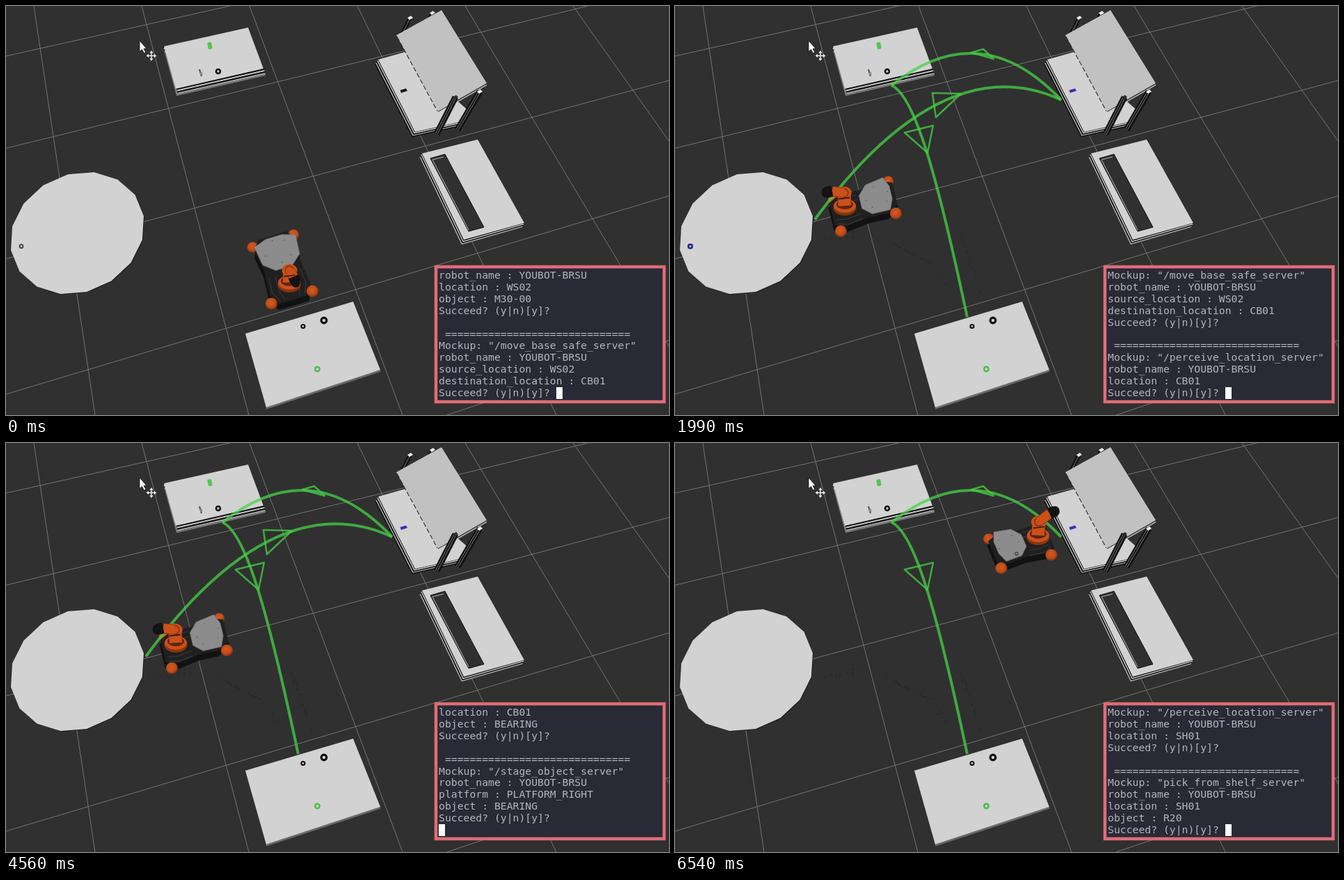
Animation of 953 by 588 pixels, one loop 8000 ms. Source, as an HTML page:

```html
<!DOCTYPE html>
<html lang="en">
<head>
<meta charset="utf-8">
<title>Robot task planner</title>
<style>
html, body { margin: 0; width: 100%; height: 100%; overflow: hidden; background: #303030; }
svg { display: block; width: 953px; height: 588px; }
text { font: 14.75px "DejaVu Sans Mono", monospace; fill: #b3b7ba; white-space: pre; }
</style>
</head>
<body>
<svg id="stage" viewBox="0 0 953 588" xmlns="http://www.w3.org/2000/svg">
  <defs>
    <radialGradient id="wheel" cx=".45" cy=".4" r=".6">
      <stop offset="0" stop-color="#d8591f"/><stop offset=".65" stop-color="#bd4c19"/><stop offset="1" stop-color="#7c3010"/>
    </radialGradient>
  </defs>
</svg>
<script>
const LOOP = 8000;
const stage = document.getElementById('stage');

function el(parent, tag, attrs) {
  const node = document.createElementNS('http://www.w3.org/2000/svg', tag);
  for (const key in attrs) node.setAttribute(key, attrs[key]);
  return parent.appendChild(node);
}
const group = (parent = stage) => el(parent, 'g', {});
const poly = (g, points, fill, stroke = 'none', width = 1) =>
  el(g, 'polygon', { points, fill, stroke, 'stroke-width': width, 'stroke-linejoin': 'round' });
const line = (g, points, stroke, width = 1, dash = 'none') =>
  el(g, 'polyline', { points, fill: 'none', stroke, 'stroke-width': width, 'stroke-dasharray': dash });
const disc = (g, [cx, cy], rx, fill, ry = rx) => el(g, 'ellipse', { cx, cy, rx, ry, fill });
const ring = (g, cx, cy, r, stroke, width) =>
  el(g, 'circle', { cx, cy, r, fill: 'none', stroke, 'stroke-width': width });

// parallel copies of an edge, one per shade
function layers(g, edge, dx, dy, shades, width = 1.4) {
  shades.forEach((shade, i) => {
    line(g, edge, shade, width).setAttribute('transform', `translate(${dx * i} ${dy * i})`);
  });
}

function drawGrid(g) {
  const gray = '#747474', horizon = -1380;
  for (let i = 0; i < 6; i++) line(g, `${40 + 155 * i},0 ${128 + 221 * i},588`, gray);
  for (let i = 0; i < 5; i++) {
    const depth = 1452 / (1 - .0836 * i), y = depth + horizon;
    line(g, `0,${y} 953,${y - 953 * depth / 6480}`, gray);
  }
}

const TOP = '#d2d2d2', BLACK = '#0c0c0c';

function drawRoundTable(g) {
  const rim = Array.from({ length: 16 }, (_, k) => {
    const a = k * Math.PI / 8, c = Math.cos(a), s = Math.sin(a);
    return [102.5 + 95.5 * c + 13.5 * s, 326.5 - 24.5 * c + 84.5 * s];
  });
  poly(g, rim, '#181818').setAttribute('transform', 'translate(.8 .8)');
  poly(g, rim, TOP);
}

function drawPost(g, x, y, dx, dy, width, cap) {
  const edge = `${x},${y} ${x + dx},${y + dy}`;
  line(g, edge, '#101010', width);
  for (let d = 3 - width / 2; d < width / 2 - 1; d += 2.5) {
    line(g, edge, '#858585', .9).setAttribute('transform', `translate(${d} ${d / 2})`);
  }
  poly(g, `${x - 4},${y} ${x + 1},${y - 3} ${x + 4},${y} ${x - 1},${y + 3}`, cap);
}

function drawTables(g) {
  drawRoundTable(g);

  layers(g, '227,58 244,120 371,91', .5, 2, [BLACK, '#c4c4c4', BLACK, '#a8a8a8', '#777'], 2);
  poly(g, '227,58 348,31 370,90 244,119', TOP);

  // shelf
  layers(g, '535,77 588,181 660,165', -1, 1.7, [BLACK, '#dcdcdc', BLACK, '#b0b0b0', BLACK]);
  poly(g, '535,77 574,66 630,120 662,148 656,166 588,181', TOP);
  line(g, '657,166 665,156', '#bbb', 1.2, '3 2');
  drawPost(g, 581, 17, -13, 26, 6, '#ededed');
  drawPost(g, 613, 10, -13, 26, 6, '#ededed');
  poly(g, '561,42 626,6 691,111 621,151', '#c1c1c1');
  line(g, '562,44 620,151', '#333', 1.2, '7 3');
  layers(g, '621,152 691,112', 0, 1.5, ['#444', '#ccc']);
  drawPost(g, 646, 131, -27, 53, 9, '#2c2c2c');
  drawPost(g, 681, 123, -32, 55, 9, '#ededed');

  // slotted table
  layers(g, '598,212 658,337 745,312', -.9, 1.7, [BLACK, '#dcdcdc', BLACK, '#b0b0b0']);
  poly(g, '598,212 678,192 745,312 658,336', TOP);
  poly(g, '610,219 631,213 687,318 665,324', '#303030', '#111');
  line(g, '665,322 613,221 629,217', '#bbb');

  layers(g, '374,578 538,524', .2, 1.2, ['#777', '#666']);
  poly(g, '344,471 499,425 538,523 374,577', TOP);
}

function drawParts(g) {
  el(g, 'rect', { x: 290, y: 52, width: 6, height: 10, rx: 2, fill: '#52c84e', transform: 'rotate(-12 293 57)' });
  line(g, '278,91 281,101', '#555', 2.2);
  line(g, '280,95 281,99', '#888', 3.5);
  for (const [x, y, r] of [[305, 94, 3], [427, 460.5, 2.5], [457, 452, 3.8]]) ring(g, x, y, r, BLACK, r * .85);
  ring(g, 447.5, 522, 3.2, '#4dbd4b', 2.5);
}

drawGrid(group());
const dust = group();
drawTables(group());
drawParts(group());

const bearing = { plain: group(), lit: group() };
ring(bearing.plain, 22, 345.5, 2.4, '#4a4a4a', 2);
ring(bearing.lit, 22, 345.5, 2.8, '#23238f', 2.6);
const block = { plain: group(), lit: group() };
for (const [g, fill] of [[block.plain, '#141414'], [block.lit, '#3434ad']]) {
  poly(g, '566.5,121 575,118.5 577,122 568,125', fill);
}

const bodies = group(), routes = group(), arms = group();
const ORANGE = '#cb5019', SHADE = '#87340f';
const SHELL = [[-1.1, .7], [-.7, 1], [0, .88], [.8, .98], [1.18, .7]];
const PLATE = [[-.95, .4], [-.8, 1], [-.15, .9], [.15, .4]];
const mirror = half => [...half, ...half.map(([a, b]) => [a, -b]).reverse()];

// A robot seen from above: centre, half length ahead, half width to its left.
function robot([cx, cy], [fx, fy], [lx, ly]) {
  const at = (a, b, lift = 0) => [cx + a * fx + b * lx, cy + a * fy + b * ly - lift];
  const outline = (half, lift) => mirror(half).map(([a, b]) => at(a, b, lift));
  const body = group(bodies), load = group(bodies), arm = group(arms);

  const wheels = [[-1, -1], [-1, 1], [1, -1], [1, 1]].map(([a, b]) => at(a, b));
  const far = wheels.filter(w => w[1] < cy), near = wheels.filter(w => w[1] >= cy);
  far.forEach(w => disc(body, w, 7.7, 'url(#wheel)'));
  poly(body, outline(SHELL, -3), '#121212', '#121212', 3);
  poly(body, outline(SHELL, 4), '#202020');
  for (const b of [-.75, -.45, .45, .75]) line(body, [at(.2, b, 2), at(.7, b * 1.1, 2), at(1.05, b * .8, 2)], '#363636', 1.3);
  poly(body, outline(PLATE, 8), '#8c8c8c', '#777', .7);
  for (let i = 0; i < 5; i++) disc(body, at(-.45 + .4 * Math.cos(i * 2.4), .65 * Math.sin(i * 2.4), 8), .8, '#555');
  near.forEach(w => disc(body, w, 8.5, 'url(#wheel)'));

  const [x, y] = at(-.31, -.7, 8);
  ring(load, x, y, 2, '#3a3a3a', 1.2);

  const base = at(.72, 0, 10), elbow = at(.75, 0, 29), wrist = at(1.18, 0, 37), tip = at(1.4, 0, 38);
  const limb = (p, q, width) => {
    line(arm, [p, q], SHADE, width + 1.5);
    line(arm, [p, q], ORANGE, width);
  };
  disc(arm, [base[0], base[1] + 3], 16.5, SHADE, 11);
  disc(arm, base, 16, ORANGE, 10);
  disc(arm, [base[0], base[1] - 2], 12, '#5a260d', 7);
  limb(base, elbow, 18);
  disc(arm, elbow, 11, ORANGE, 9);
  ring(arm, ...elbow, 6, SHADE, 1.6);
  limb(elbow, wrist, 13);
  line(arm, [[elbow[0] - 8, elbow[1] + 9], [elbow[0] + 8, elbow[1] + 7]], '#3a1b0c', 2);
  line(arm, [wrist, tip], '#131313', 16);
  disc(arm, tip, 6.5, '#131313', 7.5);
  return { parts: [body, arm], load };
}
const atTable = robot([397.5, 378.5], [13.5, 40.5], [29.5, -9]);
const atRound = robot([272.5, 288], [-39.5, 12.8], [5.5, 23]);
const atShelf = robot([496, 149.5], [36, -9.5], [-9, -21]);

function route(d, arrow) {
  const g = group(routes), stroke = 'rgba(70,210,70,.75)';
  el(g, 'path', { d, fill: 'none', stroke, 'stroke-width': 4 });
  poly(g, arrow, 'none', stroke, 2.5);
  return g;
}
const toRound = route('M420,447 Q313,327 201,307', '289,339 323,355 299,350');
const toShelf = route('M201,307 C295,178 420,72 555,135', '370,125 411,126 375,160');
const toUpper = route('M555,135 C480,56 400,44 311,114', '426,67 443,62 458,76');
const toLower = route('M311,114 C344,128 376,240 420,447', '330,182 371,172 363,211');

// faint scan marks on the floor
let seed = 7;
const rand = () => (seed = seed * 16807 % 2147483647) / 2147483647;
function scatter(x0, y0, x1, y1, spread) {
  const n = Math.hypot(x1 - x0, y1 - y0) / 2.5;
  for (let i = 0; i < n; i++) {
    const k = rand();
    el(dust, 'rect', {
      x: x0 + (x1 - x0) * k + (rand() - .5) * spread,
      y: y0 + (y1 - y0) * k + (rand() - .5) * spread,
      width: 1.3, height: 1, fill: '#232323'
    });
  }
}
scatter(302, 335, 360, 366, 4);
scatter(360, 366, 393, 402, 6);
scatter(411, 330, 439, 418, 6);
scatter(205, 333, 266, 328, 12);

// pointer with move badge
const pointer = group();
poly(pointer, '192,50 192,65.5 195.5,62.5 198.5,68 201,66.5 198,61.5 202,61', '#fff', '#111', .8);
for (let turn = 0; turn < 360; turn += 90) {
  line(pointer, '0,0 0,-6 -2,-4 0,-6 2,-4', '#eee', 1.4)
    .setAttribute('transform', `translate(209 71.5) rotate(${turn})`);
}

// terminal
const ROWS = 11, ADVANCE = 8.88, PITCH = 16.9, LEFT = 622;
const term = group();
el(term, 'rect', { x: 618, y: 375, width: 328, height: 194, fill: '#282a36', stroke: '#e06c75', 'stroke-width': 4.5 });
const rows = Array.from({ length: ROWS }, (_, i) => el(term, 'text', { x: LEFT, y: 392 + PITCH * i }));
const caret = el(term, 'rect', { y: 548, width: 9, height: 17, fill: '#fff' });

const log = [];
function ask(server, ...fields) {
  log.push('', ' ' + '='.repeat(30), `Mockup: "${server}"`, 'robot_name : YOUBOT-BRSU', ...fields, 'Succeed? (y|n)[y]? ');
  return log.length;
}
ask('/wbc_pick_object_server', 'location : WS02', 'object : M30-00');
const ends = [
  ask('/move_base_safe_server', 'source_location : WS02', 'destination_location : CB01'),
  ask('/perceive_location_server', 'location : CB01'),
  ask('/wbc_pick_object_server', 'location : CB01', 'object : BEARING'),
  ask('/stage_object_server', 'platform : PLATFORM_RIGHT', 'object : BEARING'),
  ask('/move_base_safe_server', 'source_location : CB01', 'destination_location : SH01'),
  ask('/perceive_location_server', 'location : SH01'),
  ask('pick_from_shelf_server', 'location : SH01', 'object : R20')
];
// [time, log length]; a length one past a prompt shows the bare new line
const prints = [
  [0, ends[0]], [1490, ends[1]], [2490, ends[2]],
  [3490, ends[2] + 1], [3570, ends[3]],
  [4560, ends[3] + 1], [4640, ends[4]],
  [5550, ends[4] + 1], [5630, ends[5]],
  [6540, ends[6]]
];

const PLAN = 330, LEAVE = 1990, PICK = 3730, STAGED = 5300, SHELF = 6130;
const spans = [
  [0, PLAN, bearing.plain, block.plain],
  [PLAN, PICK, bearing.lit],
  [PLAN, LOOP, block.lit, toUpper, toLower],
  [PLAN, LEAVE, toRound],
  [PLAN, SHELF, toShelf],
  [0, LEAVE, ...atTable.parts],
  [LEAVE, SHELF, ...atRound.parts],
  [SHELF, LOOP, ...atShelf.parts, atShelf.load],
  [STAGED, SHELF, atRound.load],
  [LEAVE, LOOP, dust]
];
atTable.load.remove();

let shown = -1;
function print(end) {
  if (end === shown) return;
  shown = end;
  rows.forEach((row, i) => row.textContent = log[end - ROWS + i]);
  caret.setAttribute('x', Math.round(LEFT + ADVANCE * log[end - 1].length));
}

function draw() {
  const t = performance.now() % LOOP;
  for (const [from, to, ...groups] of spans) {
    for (const g of groups) g.style.display = t >= from && t < to ? '' : 'none';
  }
  print(prints.filter(p => p[0] <= t).pop()[1]);
  requestAnimationFrame(draw);
}
draw();
</script>
</body>
</html>
```
